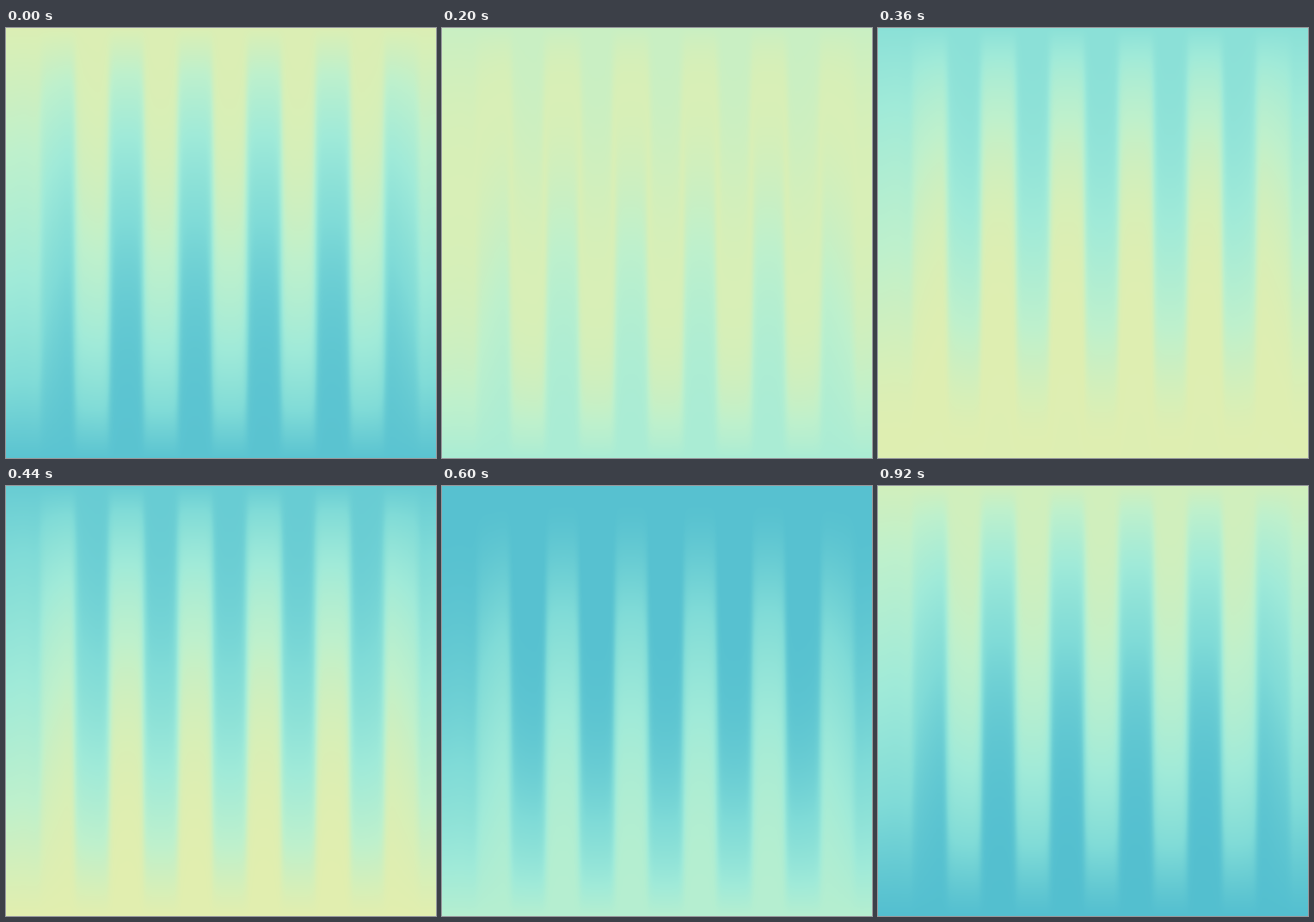
Animation of 500 by 500 pixels, one loop 0.96 s. Source, as an HTML page with a canvas:

```html
<!DOCTYPE html>
<html>
<head>
<meta charset="utf-8">
<style>
  html, body { margin: 0; width: 100%; height: 100%; overflow: hidden; }
  canvas { display: block; width: 500px; height: 500px; }
</style>
</head>
<body>
<canvas id="stage" width="500" height="500"></canvas>
<script>
const SIZE = 500, LEVELS = 1024, LOOP = 960, STEP = 40;
const TOP_PEAK = 68, TRAVEL = 347; // ms: yellow peak at the top, and its delay at the bottom
const POWER = 2.4;
const PALETTE = [[82, 190, 207], [128, 219, 215], [160, 234, 216], [190, 240, 204], [226, 238, 174]];
const ctx = document.getElementById('stage').getContext('2d');
const image = ctx.createImageData(SIZE, SIZE);
const pixels = new Uint32Array(image.data.buffer);

// Delay of the wave at each pixel: alternate columns are reached early or late.
const delay = new Uint16Array(SIZE * SIZE);
for (let x = 0; x < SIZE; x++) {
  const px = x + 0.5;
  const edge = Math.min(px, 520 - px);
  const strength = 1 - Math.exp(-((edge / 60) ** 2));
  const lag = strength * Math.tanh(3 * Math.sin(Math.PI * px / 40)) + 0.3 * Math.exp(-((edge / 25) ** 2));
  const mix = 0.5 + 0.5 * lag;
  for (let y = 0; y < SIZE; y++) {
    const h = (y + 0.5) / SIZE;
    const late = h ** POWER, early = 1 - (1 - h) ** POWER;
    const s = Math.min(1, Math.max(0, early + (late - early) * mix));
    delay[y * SIZE + x] = Math.round(s * (LEVELS - 1));
  }
}

function colour(v) {
  const p = (v + 1) * 2;
  const i = Math.min(3, Math.floor(p));
  const [r, g, b] = PALETTE[i].map((c, k) => Math.round(c + (PALETTE[i + 1][k] - c) * (p - i)));
  return (255 << 24 | b << 16 | g << 8 | r) >>> 0;
}

const ramp = new Uint32Array(LEVELS);
function draw(time) {
  for (let i = 0; i < LEVELS; i++) {
    const s = i / (LEVELS - 1);
    const amplitude = 1 - 0.16 * Math.sin(Math.PI * s);
    const peak = TOP_PEAK + TRAVEL * s;
    ramp[i] = colour(amplitude * Math.cos(2 * Math.PI * (time - peak) / LOOP));
  }
  for (let i = 0; i < pixels.length; i++) pixels[i] = ramp[delay[i]];
  ctx.putImageData(image, 0, 0);
}

let shown = -1;
function tick() {
  let slot = Math.floor(performance.now() % LOOP / STEP);
  if (slot === 6) slot = 5; // one pose is held twice as long
  if (slot !== shown) draw((shown = slot) * STEP);
  requestAnimationFrame(tick);
}
tick();
</script>
</body>
</html>
```
